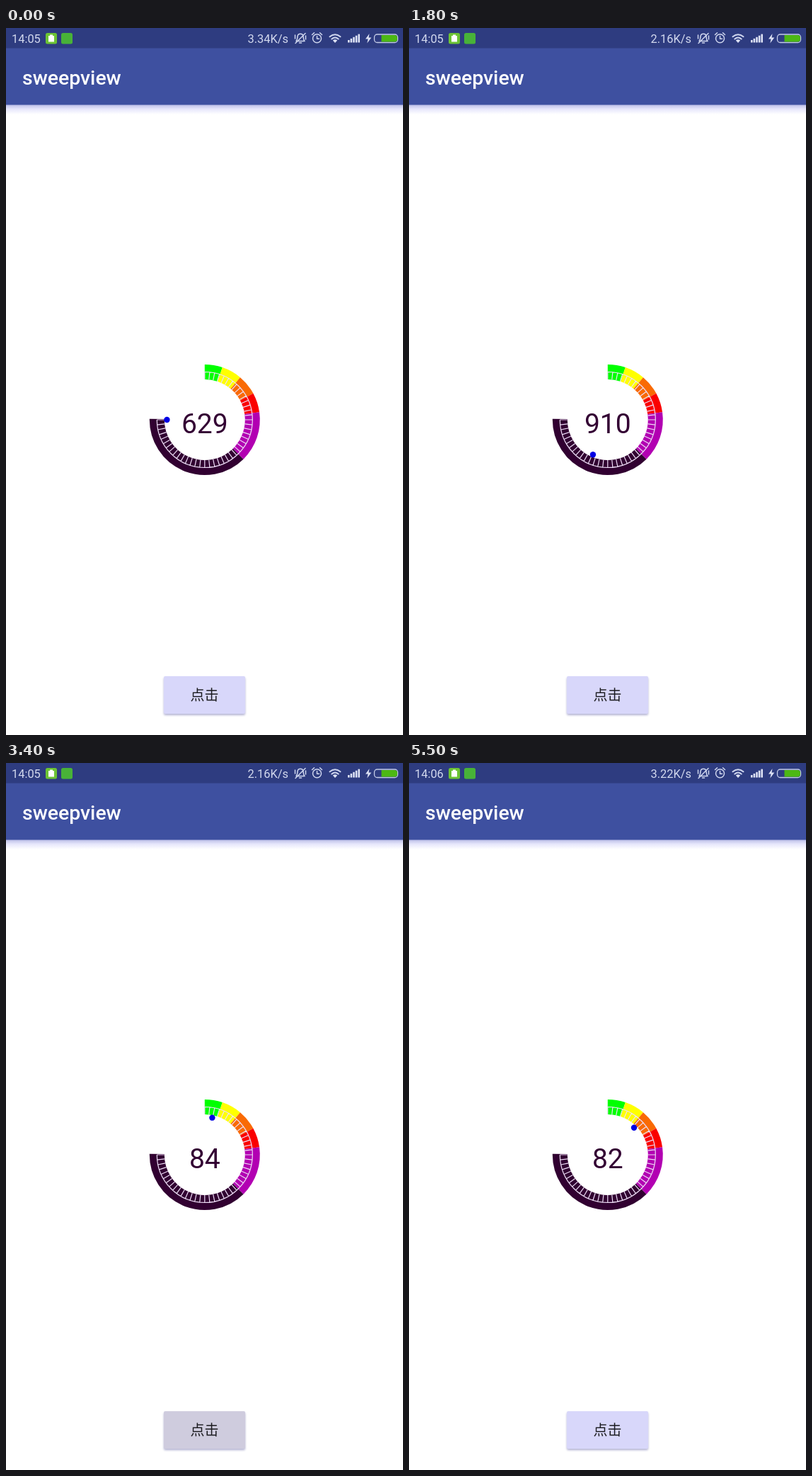
An HTML page that plays this animation: 561x998 px, repeating every 6.3 s.

```html
<!DOCTYPE html>
<html lang="zh">
<head>
<meta charset="utf-8">
<title>sweepview</title>
<style>
  html, body { margin: 0; width: 100%; height: 100%; overflow: hidden; background: #fff; }
  svg { display: block; width: 561px; height: 998px; }
  text { font-family: Roboto, "Noto Sans", sans-serif; }
  .status { font-size: 16.4px; fill: #d3d9ee; }
  .title { font-size: 28.4px; font-weight: 500; fill: #fff; }
  .value { font-size: 39px; fill: #330033; text-anchor: middle; }
  .label { font: 20px "Noto Sans CJK SC", "Noto Sans CJK", sans-serif; fill: #1c1c20; text-anchor: middle; }
  .icon { fill: none; stroke: #cfd6ee; stroke-width: 1.5; stroke-linecap: round; stroke-linejoin: round; }
  .solid { fill: #dde2f4; }
</style>
</head>
<body>
<svg viewBox="0 0 561 998">
  <defs>
    <linearGradient id="drop" x1="0" y1="0" x2="0" y2="1">
      <stop offset="0" stop-color="#b9bce6"/>
      <stop offset=".45" stop-color="#e6e6fb"/>
      <stop offset="1" stop-color="#fff"/>
    </linearGradient>
    <filter id="soft" x="-10%" y="-20%" width="120%" height="150%">
      <feGaussianBlur stdDeviation="1.4"/>
    </filter>
  </defs>

  <rect width="561" height="998" fill="#fff"/>
  <rect y="108" width="561" height="14" fill="url(#drop)"/>
  <rect y="28" width="561" height="80.5" fill="#3e50a0"/>
  <rect width="561" height="28.5" fill="#2e3c80"/>
  <text class="title" x="23" y="80">sweepview</text>

  <text id="clock" class="status" x="8" y="21"></text>
  <rect x="56" y="7" width="16" height="15.5" rx="2.5" fill="#6cc334"/>
  <path d="M60 11h2v-1.500h4V11h2v8.500h-8z" fill="#fff"/>
  <rect x="78" y="7" width="16" height="15.500" rx="2.500" fill="#48b238"/>
  <text id="speed" class="status" x="399" y="21" text-anchor="end"></text>

  <g class="icon">
    <path d="M410 18.500c2-2 1.500-4 2-6.500 .5-5 7.500-5 8 0 .5 2.500 0 4.500 2 6.500zM414.500 21h3M409 21.500L423 7.500M408.500 10v5M423.500 11v5"/>
    <circle cx="439.500" cy="14.800" r="6"/>
    <path d="M439.500 11.500v3.800h3M432.500 9.500l3-2.800M446.500 9.500l-3-2.800"/>
    <path d="M457.500 12.300q7.500-6.200 15 0M460.300 15.500q4.700-4 9.400 0" stroke-width="2"/>
  </g>
  <path class="solid" d="M461.800 17.500q3.200-2.400 6.400 0l-3.200 3.500z"/>
  <g id="bars" class="solid"></g>
  <path class="solid" d="M513.500 8l-5.500 7.500h3.600l-1.300 6 6-8h-3.800z"/>
  <rect x="520.500" y="9" width="33" height="11.500" rx="4" fill="none" stroke="#c3cbe6" stroke-width="1.300"/>
  <path d="M530.500 10h18.500q4 0 4 4v1.500q0 4-4 4h-18.500z" fill="#4cb814"/>

  <g id="ring" fill="none"></g>
  <text id="value" class="value" x="280.800" y="572"></text>
  <circle id="dot" r="4.200" fill="#0000e4"/>

  <rect x="223" y="917" width="115" height="53" rx="2" fill="#9a9ac4" opacity=".75" filter="url(#soft)"/>
  <rect id="button" x="223" y="915" width="115" height="53" rx="2"/>
  <text class="label" x="280.500" y="949">点击</text>
</svg>
<script>
const LOOP = 6300, STEP = 100, LAST = 5500, SWEEP = 1000, FULL = 270;
const CX = 280.8, CY = 553;
const $ = id => document.getElementById(id);

// tap time, value reached
const taps = [[-2000, 629], [1132, 1210], [2101, 570], [3268, 1974], [5235, 503]];
// start time, network speed
const speeds = [[0, "3.34K/s"], [1300, "2.16K/s"], [5000, "3.22K/s"]];
// end angle, colour
const zones = [
  [18.7, "#00ff00"], [40, "#ffff00"], [61.5, "#f96a04"],
  [82, "#fa0000"], [135.5, "#b200b2"], [271, "#310031"]
];

function polar(r, deg) {
  const a = deg * Math.PI / 180;
  return [CX + r * Math.sin(a), CY - r * Math.cos(a)];
}

function add(parent, tag, attrs) {
  const el = document.createElementNS("http://www.w3.org/2000/svg", tag);
  for (const k in attrs) el.setAttribute(k, attrs[k]);
  parent.append(el);
}

function arc(r, from, to) {
  return `M${polar(r, from)}A${r} ${r} 0 ${to - from > 180 ? 1 : 0} 1 ${polar(r, to)}`;
}

let from = 0;
for (const [to, stroke] of zones) {
  add($("ring"), "path", { d: arc(67.5, from, to), stroke, "stroke-width": 21 });
  from = to;
}
let grid = arc(67.5, 0, FULL);
for (let a = 0; a <= FULL; a += 6) grid += `M${polar(57, a)}L${polar(67.5, a)}`;
add($("ring"), "path", { d: grid, stroke: "#eddff6", "stroke-width": 1.2 });

for (let i = 0; i < 5; i++) {
  const h = 3.5 + i * 2.1;
  add($("bars"), "rect", { x: 483 + i * 3.6, y: 20.5 - h, width: 2.6, height: h });
}

const latest = (list, t) => list.filter(e => e[0] <= t).pop();

function draw(t) {
  const [start, goal] = latest(taps, t);
  const k = Math.min(1, (t - start) / SWEEP);
  const p = (1 - Math.cos(Math.PI * k)) / 2;
  const [x, y] = polar(53.4, p * FULL);
  $("dot").setAttribute("cx", x);
  $("dot").setAttribute("cy", y);
  $("value").textContent = Math.round(p * goal);
  $("speed").textContent = latest(speeds, t)[1];
  $("clock").textContent = t < 5000 ? "14:05" : "14:06";
  const pressed = taps.some(([s]) => t >= s - 70 && t < s + 230);
  $("button").setAttribute("fill", pressed ? "#cfccde" : "#d8d7fa");
}

const t0 = performance.now();
function tick() {
  const t = (performance.now() - t0) % LOOP;
  draw(Math.min(LAST, Math.floor(t / STEP) * STEP));
  requestAnimationFrame(tick);
}
tick();
</script>
</body>
</html>
```
